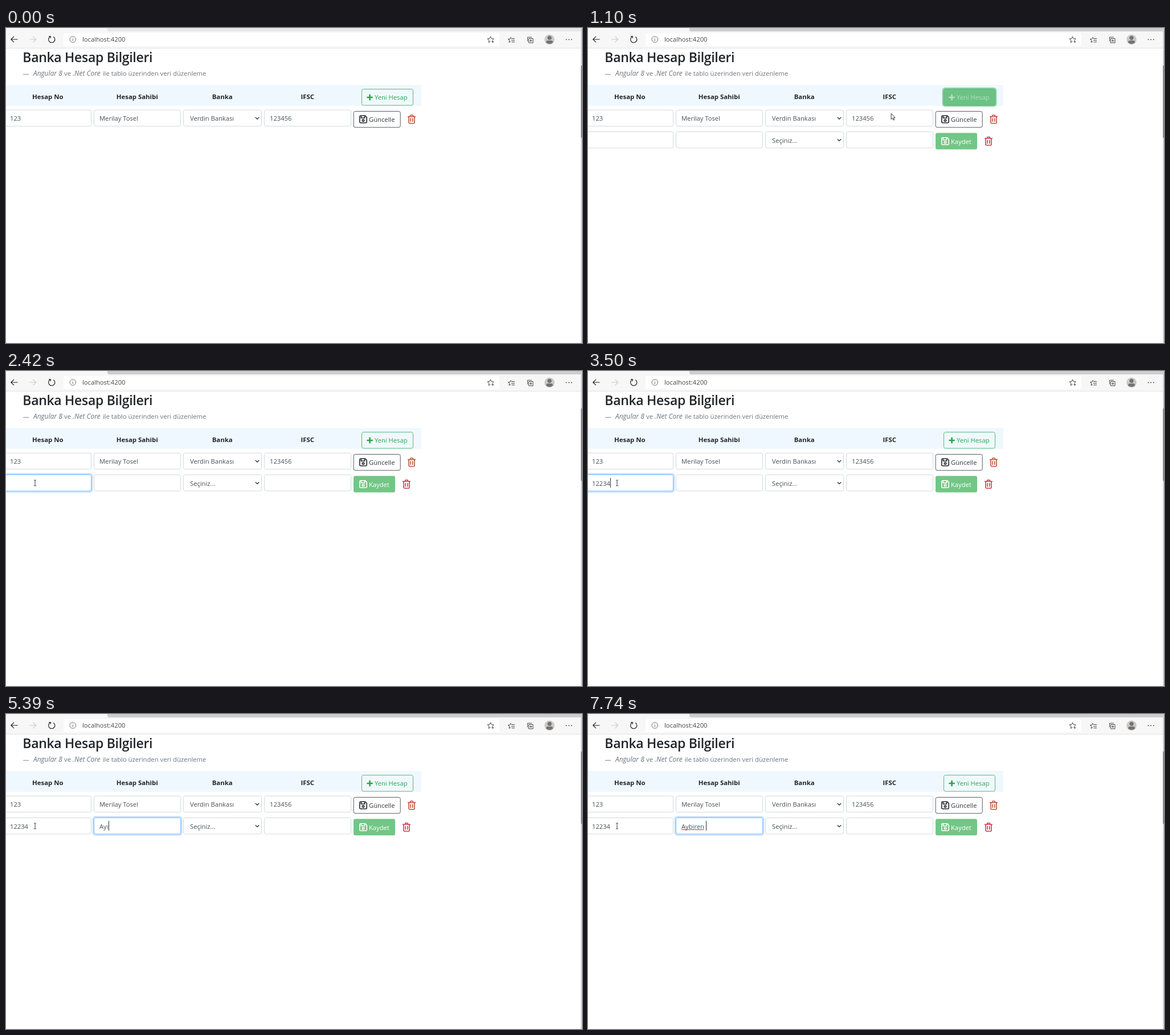
An HTML page for the animation above (8000 ms loop, 1011 px wide and 554 px high).

```html
<!DOCTYPE html>
<html lang="tr">
<head>
<meta charset="utf-8">
<title>Banka Hesap Bilgileri</title>
<style>
html, body { margin: 0; width: 100%; height: 100%; overflow: hidden; background: #fff }
svg { display: block; font: 11.2px "Open Sans", "Noto Sans", sans-serif; fill: #495057 }
text { white-space: pre }
.line { fill: none; stroke: #222; stroke-width: 1.2 }
.thin { fill: none; stroke: #333; stroke-width: .9 }
.field { fill: #fff; stroke: #d3d8dd }
.title { font-size: 23px; font-weight: 600; letter-spacing: -.3px; fill: #212529 }
.sub { font-size: 11.3px; fill: #6c757d }
.it { font-style: italic; font-size: 12px }
.head { font-size: 11.4px; font-weight: 700; fill: #212529; text-anchor: middle }
.icon { fill: none; stroke: currentColor; stroke-width: 1.6 }
</style>
</head>
<body>
<svg width="1011" height="554" viewBox="0 0 1011 554">
  <defs>
    <g id="save" class="icon">
      <path d="M2.3.8h8.2l2.7 2.7v8.2a1.5 1.5 0 0 1-1.5 1.5H2.3a1.5 1.5 0 0 1-1.5-1.5V2.3A1.5 1.5 0 0 1 2.3.8zM3.4 1v3.7h6.2V1"/>
      <circle cx="7" cy="8.9" r="1.7"/>
    </g>
    <g id="trash" class="icon">
      <path d="M0 3.2h14M4 3l1.1-2.2h3.8L10 3M2 3.5v10.3a1.4 1.4 0 0 0 1.4 1.4h7.2a1.4 1.4 0 0 0 1.4-1.4V3.5M5.2 6v6.6M8.8 6v6.6"/>
    </g>
    <path id="chevron" d="M-3.2-1.6 0 1.6 3.2-1.6" fill="none" stroke="#343a40" stroke-width="1.4"/>
    <path id="star" d="M3.2 1.2 5.5-1.6 1.6-1.9 0-5.6-1.6-1.9-5.5-1.6-2.5 1-3.4 4.9 0 2.8"/>
  </defs>

  <!-- browser bar -->
  <rect width="1011" height="35" fill="#f7f7f7"/>
  <path id="tabs" d="M178 0H1010V6H181Q178 6 178 3z"/>
  <path d="M0 35.5H1010" stroke="#e3e3e3"/>
  <rect x="101" y="9" width="765" height="22.5" rx="3" fill="#fff"/>
  <path class="line" d="M20.5 20H9M14 14.8 8.8 20 14 25.2"/>
  <path class="line" d="M41 20H52.5M47.5 14.8 52.7 20 47.5 25.2" style="stroke:#ccc"/>
  <path class="line" d="M77 15.6A5.6 5.6 0 1 0 83.2 15.4M75.2 14.6H78.2V18"/>
  <path class="thin" d="M112 20a5.3 5.3 0 1 0 10.6 0a5.3 5.3 0 1 0-10.6 0M117.3 19v4M117.3 16.7v1.2" style="stroke:#666"/>
  <text x="134" y="24.3" fill="#444">localhost:4200</text>
  <g class="thin">
    <use href="#star" x="850.5" y="20.5"/>
    <path d="M854.3 22v4M852.3 24h4"/>
    <path d="M886 16.5 884.7 19.3 881.2 19.6 883.8 21.8 883 25.3 886 23.5M886 16.5 887.5 18.5H893M887 21.5h6M887.5 24.5h5.5"/>
    <path d="M917.5 18.5h7.5v7.5h-7.5zM915.5 23.5V16.2h7.5M921.2 20v4.5M919 22.2h4.5"/>
  </g>
  <circle cx="954" cy="20.3" r="8.8" fill="#cbc9c7"/>
  <circle cx="954" cy="17.3" r="3.6" fill="#76726f"/>
  <path d="M948 25.5Q948 22 951 22h6Q960 22 960 25.5Q957 28 954 28T948 25.5" fill="#76726f"/>
  <path d="M983.5 20.3h10.5" stroke="#222" stroke-width="1.7" stroke-linecap="round" stroke-dasharray="0 4.6"/>
  <path d="M1010 0V554" stroke="#d2d2d2" stroke-width="2"/>
  <path d="M1010 66V193" stroke="#8a8a8a" stroke-width="2"/>

  <!-- page -->
  <text class="title" x="29.3" y="60">Banka Hesap Bilgileri</text>
  <g class="sub">
    <text x="29.5" y="83.8">—</text>
    <text class="it" x="48" y="83.8">Angular 8</text>
    <text x="102" y="83.8">ve</text>
    <text class="it" x="117" y="83.8">.Net Core</text>
    <text x="169.7" y="83.8">ile tablo üzerinden veri düzenleme</text>
  </g>
  <rect y="100" width="729" height="37" fill="#f0f8ff"/>
  <g class="head">
    <text x="73.3" y="124.6">Hesap No</text>
    <text x="230.3" y="124.6">Hesap Sahibi</text>
    <text x="379.7" y="124.6">Banka</text>
    <text x="529.2" y="124.6">IFSC</text>
  </g>
  <rect id="addRing" x="623" y="106" width="93" height="31" rx="4" fill="none" stroke="#28a745" stroke-width="2.6"/>
  <rect id="addBox" x="624.5" y="107.5" width="90" height="28.5" rx="3" fill="#28a745" stroke="#58b87a"/>
  <g id="addLabel">
    <path d="M638.6 116.8v10.4M633.4 122h10.4" stroke="currentColor" stroke-width="2.6"/>
    <text x="647" y="126.3" fill="currentColor">Yeni Hesap</text>
  </g>

  <g id="row1">
    <text x="7" y="163.2">123</text>
    <text x="164" y="163.2">Merilay Tosel</text>
    <text x="323" y="163.2">Verdin Bankası</text>
    <text x="463" y="163.2">123456</text>
    <rect x="610.2" y="146.5" width="82" height="28.3" rx="3" fill="#fff" stroke="#565b60"/>
    <use href="#save" x="620" y="153.5" color="#212529"/>
    <text x="637" y="165.3" fill="#343a40">Güncelle</text>
    <use href="#trash" x="705" y="152.5" color="#c0533a"/>
  </g>

  <g id="row2">
    <text id="no" x="7" y="201.6"></text>
    <text id="owner" x="164" y="201.6"></text>
    <path id="spell" stroke="#e0343c"/>
    <text x="323" y="201.6">Seçiniz...</text>
    <rect x="610" y="184.5" width="73" height="29" rx="3" fill="#73c686"/>
    <use href="#save" x="620" y="192" color="#fff"/>
    <text x="637" y="203.8" fill="#fff">Kaydet</text>
    <use href="#trash" x="696" y="191" color="#d6394a"/>
    <rect id="caret" y="188" width="1" height="17" fill="#333"/>
  </g>

  <g id="pointer" fill="#fff" stroke="#222" stroke-width=".9">
    <path id="arrow" d="M0 0V10.2L2.4 8 4 11.7 5.5 11 4 7.5H7z"/>
    <path id="hand" d="M-1 1Q0-.6 1 1V5.5L4.6 6.5Q5.6 7 5.4 8.5L4.4 14.5H-1.6L-4.6 9.5Q-4.6 7.6-3 8.3L-1 10z"/>
    <path id="beam" d="M-2-5H-.5L0-4.5 .5-5H2M0-4.5V4.5M-2 5H-.5L0 4.5 .5 5H2" fill="none"/>
  </g>
</svg>
<script>
const $ = id => document.getElementById(id);
const clamp = v => Math.max(0, Math.min(1, v));
const fade = (t, start) => clamp((t - start) / 150);
const mix = (a, b, k) => `color-mix(in srgb, ${b} ${k * 100}%, ${a})`;
const show = (id, on) => $(id).style.display = on ? '' : 'none';

// Adds a shape underneath everything else in its row.
function addBelow(row, tag, attrs) {
  const el = document.createElementNS('http://www.w3.org/2000/svg', tag);
  for (const k in attrs) el.setAttribute(k, attrs[k]);
  $(row).prepend(el);
  return el;
}

// Left edge and width of each field.
const columns = [[-4.5, 154], [154.5, 152], [311.5, 137], [453.5, 152]];

function addFields(row, y) {
  addBelow(row, 'use', { href: '#chevron', x: 441, y: y + 14.5 });
  return columns.map(([x, width]) =>
    addBelow(row, 'rect', { class: 'field', x, y, width, height: 28.5, rx: 3 }));
}

addFields('row1', 144.2);
const fields = addFields('row2', 182.5);
const rings = columns.slice(0, 2).map(([x, width]) => addBelow('row2', 'rect', {
  x: x - 1.6, y: 180.9, width: width + 3.2, height: 31.7, rx: 4,
  fill: 'none', stroke: '#007bff', 'stroke-width': 2.4
}));

const noKeys = [[0, ''], [2650, '1'], [2880, '12'], [2970, '122'], [3200, '1223'], [3500, '12234']];
const ownerKeys = [[0, ''], [4840, 'A'], [5080, 'Ay'], [5390, 'Ayı'], [6090, 'Ay'], [6560, 'Ayb'],
  [6790, 'Aybi'], [6870, 'Aybir'], [7110, 'Aybire'], [7280, 'Aybiren'], [7740, 'Aybiren ']];
const caretOff = [[0, 1780], [2420, 2650], [4380, 4840], [5940, 6490]];
const typed = (keys, t) => keys.findLast(k => k[0] <= t)[1];

// Pointer path: time, x, y.
const path = [[70, 820, 505], [240, 700, 350], [450, 550, 205], [690, 655, 129], [1000, 655, 129],
  [1200, 385, 176], [1470, 68, 215], [1550, 67, 215], [1700, 51, 197], [8000, 51, 197]];

function pointerAt(t) {
  const i = path.findIndex(p => p[0] > t);
  const [a, b] = [path[i - 1], path[i]];
  const k = (t - a[0]) / (b[0] - a[0]);
  const s = k * k * (3 - 2 * k);
  return [a[1] + (b[1] - a[1]) * s, a[2] + (b[2] - a[2]) * s];
}

// The pointer moves in steps of 77 ms, counted anew from the click.
function drawPointer(t) {
  show('pointer', t >= 70);
  if (t < 70) return;
  const start = t < 940 ? 70 : 940;
  const [x, y] = pointerAt(start + Math.floor((t - start) / 77) * 77);
  const onButton = x > 624 && x < 715 && y > 107 && y < 136;
  const inField = t > 1470 && x < 150 && y < 211;
  $('pointer').setAttribute('transform', `translate(${x} ${y})`);
  show('hand', onButton);
  show('beam', inField);
  show('arrow', !onButton && !inField);
}

function draw(t) {
  $('tabs').setAttribute('fill', t < 940 ? '#e6e6e6' : '#cdcdcd');

  const hover = fade(t, 653) - fade(t, 1050);
  $('addBox').setAttribute('fill-opacity', hover);
  $('addLabel').style.color = mix('#28a745', '#fff', hover);
  $('addRing').setAttribute('stroke-opacity', .5 * (fade(t, 940) - fade(t, 1780)));

  show('row2', t >= 1010);
  [fade(t, 1780) - fade(t, 3820), fade(t, 3820)].forEach((focus, i) => {
    rings[i].setAttribute('stroke-opacity', .25 * focus);
    fields[i].style.stroke = mix('#d3d8dd', '#80bdff', focus);
  });

  $('no').textContent = typed(noKeys, t);
  $('owner').textContent = typed(ownerKeys, t);
  const active = $(t < 3820 ? 'no' : 'owner');
  const length = active.textContent ? active.getComputedTextLength() : 0;
  $('caret').setAttribute('x', Math.round(+active.getAttribute('x') + length));
  show('caret', !caretOff.some(([a, b]) => t >= a && t < b));
  show('spell', t >= 7740);
  $('spell').setAttribute('d', `M164 203.5h${Math.max(0, length - 3)}`);

  drawPointer(t);
}

const began = performance.now();
(function loop() {
  draw((performance.now() - began) % 8000);
  requestAnimationFrame(loop);
})();
</script>
</body>
</html>
```
